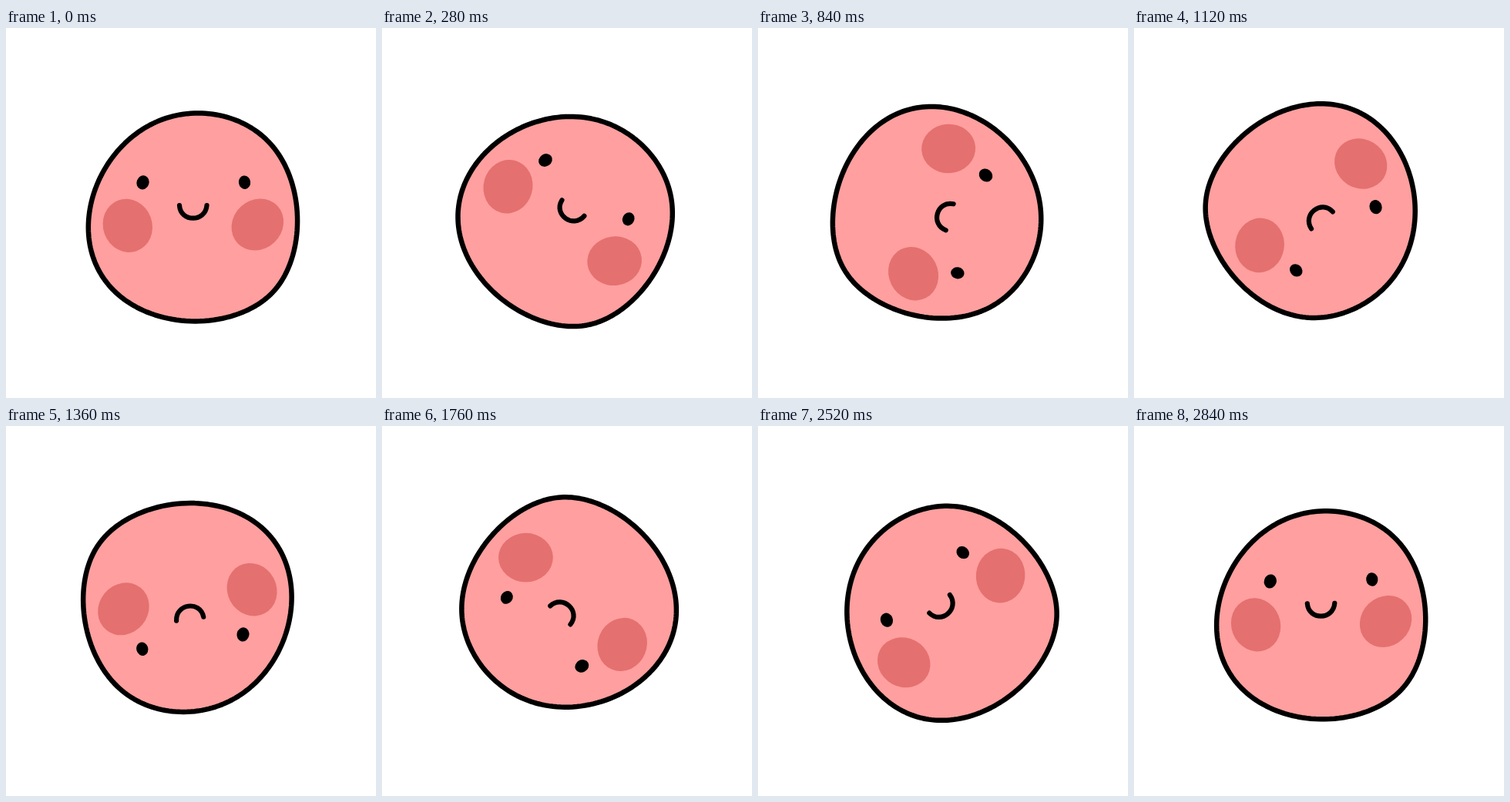
An HTML page with a canvas for the animation above (2.88 s loop, 480 px wide and 480 px high).

```html
<!DOCTYPE html>
<html lang="en">
<head>
<meta charset="utf-8">
<title>Rolling blob</title>
<style>
  html, body { margin: 0; width: 100%; height: 100%; overflow: hidden; background: #fff; }
  canvas { display: block; width: 100vw; height: 100vh; }
</style>
</head>
<body>
<canvas id="stage" width="480" height="480"></canvas>
<script>
const ctx = document.getElementById('stage').getContext('2d');
const LOOP = 2880, STEP = 40, DEG = Math.PI / 180;
const SWEEP = 359 * DEG;          // turn from the first step to the last
const OUTLINE = 6.5;
const INK = '#000', SKIN = '#ff9f9f', BLUSH = '#e57070';

// Distance from the pivot to the outline's tangent, as [cos, sin] harmonics
const RADIUS = 139.76;
const WAVES = [[4.35, 7.74], [0.32, -1.51], [-1.55, 2.29], [-1.19, -0.3], [-0.35, -0.05]];

function bodyPath() {
  const path = new Path2D();
  for (let deg = 0; deg < 360; deg += 2) {
    const a = deg * DEG;
    let h = RADIUS - OUTLINE / 2, slope = 0;
    WAVES.forEach(([p, q], i) => {
      const k = i + 1, c = Math.cos(k * a), s = Math.sin(k * a);
      h += p * c + q * s;
      slope += k * (q * c - p * s);
    });
    path.lineTo(h * Math.cos(a) - slope * Math.sin(a),
                h * Math.sin(a) + slope * Math.cos(a));
  }
  path.closePath();
  return path;
}

const body = bodyPath();
const mouth = new Path2D('M-15 -9.8 C-13.5 12.2 18.5 12.2 20.5 -9.8');

function oval(x, y, rx, ry, tilt, color) {
  ctx.beginPath();
  ctx.ellipse(x, y, rx, ry, tilt * DEG, 0, 2 * Math.PI);
  ctx.fillStyle = color;
  ctx.fill();
}

function outline(path, width) {
  ctx.lineWidth = width;
  ctx.stroke(path);
}

function draw(now) {
  const time = Math.floor((now % LOOP) / STEP) * STEP;
  ctx.setTransform(1, 0, 0, 1, 0, 0);
  ctx.fillStyle = '#fff';
  ctx.fillRect(0, 0, 480, 480);
  ctx.translate(240, 240);
  ctx.rotate(SWEEP * time / (LOOP - STEP));

  ctx.strokeStyle = INK;
  ctx.lineCap = ctx.lineJoin = 'round';
  ctx.fillStyle = SKIN;
  ctx.fill(body);
  outline(body, OUTLINE);

  oval(-82.2, 16.4, 35, 31.8, 70, BLUSH);
  oval(86.3, 15, 35.4, 31.8, 137, BLUSH);
  oval(-62.5, -39.6, 8, 9.2, 20, INK);
  oval(69.5, -39.8, 7.6, 8.8, -8, INK);
  outline(mouth, 6.2);
}

function tick() {
  draw(performance.now());
  requestAnimationFrame(tick);
}
tick();
</script>
</body>
</html>
```
